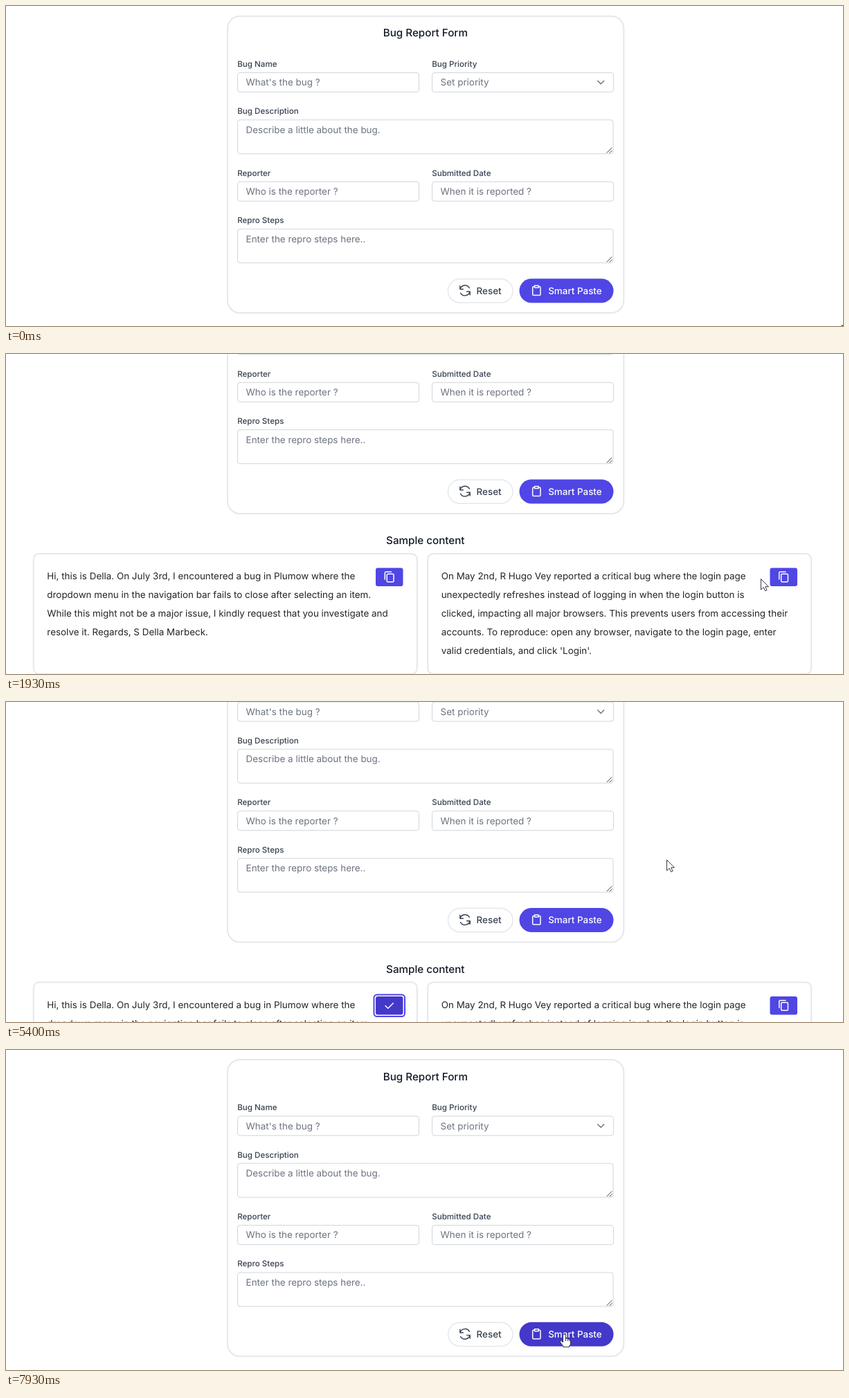
Recreate the animation shown at these times as an HTML page. Size 1209 px wide and 463 px high, loop 8 s.

```html
<!DOCTYPE html>
<html lang="en">
<head>
<meta charset="utf-8">
<title>Bug report form</title>
<style>
  html, body { margin: 0; width: 100%; height: 100%; overflow: hidden; background: #fff; }
  svg {
    display: block; width: 100%; height: 100%;
    font-family: Inter, "Open Sans", sans-serif;
    font-optical-sizing: none; text-rendering: geometricPrecision;
  }
  .title { font-size: 15.2px; font-weight: 500; fill: #111827; text-anchor: middle; }
  .label { font-size: 11.6px; font-weight: 500; fill: #374151; }
  .hint { font-size: 13.43px; fill: #6b7280; }
  .body { font-size: 13.43px; fill: #212529; }
  .action { font-size: 13.43px; font-weight: 500; fill: #374151; }
  .card { fill: #fff; stroke: #e5e7eb; stroke-width: 2; }
  .field { fill: #fff; stroke: #d1d5db; }
  .line { fill: none; stroke: #374151; stroke-width: 1.4; stroke-linecap: round; stroke-linejoin: round; }
  .white { stroke: #fff; stroke-width: 1.5; }
  .cursor { fill: #fff; stroke: #1f2430; stroke-width: 0.9; stroke-linejoin: round; }
</style>
</head>
<body>
<svg id="stage" viewBox="0 0 1209 463" preserveAspectRatio="xMinYMin meet"></svg>
<script>
const LOOP = 8000;
const TICK = 1000 / 15;
const PRIMARY = '#4f46e5', HOVER = '#4338ca', ACTIVE = '#3730a3';
const PRESS = 3530, RELEASE = 3660;

// Page geometry
const copyBox = { x: 534, y: 522.5, w: 39.5, h: 26.5 };
const otherCopyBox = { ...copyBox, x: 1103.5 };
const pasteBox = { x: 741.5, y: 394.5, w: 136, h: 35 };

// Motion keys: [time, value]
const scrollKeys = [
  [800, 0], [867, 31], [1000, 82], [1200, 135.5], [1500, 182], [1933, 213], [2067, 219.5],
  [4667, 219.5], [5400, 96.5], [5533, 96.5], [5800, 41], [5933, 41], [6533, 9.5],
  [6600, 9.5], [6933, 0.7]
];
const cursorX = [
  [67, 1207.5], [400, 1090.5], [2467, 1090.5], [2867, 800], [3200, 534], [3333, 540.5],
  [3733, 540.5], [4267, 947], [4400, 954.5], [7200, 954.5], [7867, 806.5]
];
const cursorY = [
  [67, 461.5], [400, 325.5], [2467, 325.5], [2867, 268], [3333, 316],
  [3733, 316], [4267, 229], [4400, 228.5], [7200, 228.5], [7867, 411]
];

// Drawing helpers
const text = (kind, x, y, content) => `<text class="${kind}" x="${x}" y="${y}">${content}</text>`;
const rect = (kind, x, y, w, h, r, extra = '') =>
  `<rect class="${kind}" x="${x}" y="${y}" width="${w}" height="${h}" rx="${r}" ${extra}/>`;
const path = (kind, d, extra = '') => `<path class="${kind}" d="${d}" ${extra}/>`;
const button = (box, r, id) => rect('', box.x, box.y, box.w, box.h, r, `id="${id}" fill="${PRIMARY}"`);

const input = (x, y, label, hint) =>
  text('label', x + 0.2, y - 8, label) + rect('field', x + 0.5, y + 0.5, 262, 28, 3.5) +
  text('hint', x + 12.6, y + 19.3, hint);

const textarea = (y, label, hint) =>
  text('label', 334.2, y - 8, label) + rect('field', 334.5, y + 0.5, 542.5, 49, 3.5) +
  text('hint', 346.6, y + 19.6, hint) +
  path('line', `M868 ${y + 48}l7 -7M872 ${y + 48.3}l3.3 -3.3`, 'style="stroke-width:1"');

const paragraph = (x, lines) =>
  lines.map((content, i) => text('body', x, 539.4 + i * 26.86, content)).join('');

const copyIcon = box => `<g transform="translate(${box.x} ${box.y})">` +
  rect('line white', 16.2, 8.7, 9.8, 11.6, 1.5) +
  path('line white', 'M13.3 16.5V7.2Q13.3 5.7 14.8 5.7H22.5') + '</g>';

const refreshIcon = path('line',
  'M656 409.5A7.3 7.3 0 0 1 669.4 408M670 413.5A7.3 7.3 0 0 1 656.6 415.3' +
  'M655.8 405V409.7H660.3M670.2 418V413.3H665.7');
const clipboardIcon = path('line white',
  'M763.5 406H762Q760.7 406 760.7 407.4V417.3Q760.7 418.6 762 418.6H770.7' +
  'Q772 418.6 772 417.3V407.4Q772 406 770.7 406H769.2M763.5 404.5H769.2V407.5H763.5Z');

const stage = document.getElementById('stage');
stage.innerHTML = `<g id="page">
  ${rect('card', 320, 14.7, 572.3, 429.3, 18)}
  ${text('title', 605.8, 44.4, 'Bug Report Form')}
  ${input(334, 96, 'Bug Name', "What's the bug ?")}
  ${input(615, 96, 'Bug Priority', 'Set priority')}
  ${path('line', 'M854.7 108.2L859.2 112.7L863.7 108.2', 'style="stroke:#6b7280"')}
  ${textarea(164.3, 'Bug Description', 'Describe a little about the bug.')}
  ${input(334, 253.8, 'Reporter', 'Who is the reporter ?')}
  ${input(615, 253.8, 'Submitted Date', 'When it is reported ?')}
  ${textarea(322.2, 'Repro Steps', 'Enter the repro steps here..')}
  ${rect('', 638.5, 395, 93.5, 34.3, 17.1, 'fill="#fff" stroke="#e5e7eb" stroke-width="1.4"')}
  ${refreshIcon}${text('action', 679.6, 416.7, 'Reset')}
  ${button(pasteBox, 17.5, 'paste')}
  ${clipboardIcon}${text('action', 783.2, 416.7, 'Smart Paste').replace('<text', '<text style="fill:#fff"')}
  ${text('title', 605.8, 488, 'Sample content')}
  ${rect('card', 39.8, 502, 554, 174, 8)}
  ${rect('card', 609.2, 502, 554, 174, 8)}
  ${paragraph(59.3, [
    'Hi, this is Della. On July 3rd, I encountered a bug in Plumow where the',
    'dropdown menu in the navigation bar fails to close after selecting an item.',
    'While this might not be a major issue, I kindly request that you investigate and',
    'resolve it. Regards, S Della Marbeck.'
  ])}
  ${paragraph(628.7, [
    'On May 2nd, R Hugo Vey reported a critical bug where the login page',
    'unexpectedly refreshes instead of logging in when the login button is',
    'clicked, impacting all major browsers. This prevents users from accessing their',
    'accounts. To reproduce: open any browser, navigate to the login page, enter',
    "valid credentials, and click 'Login'."
  ])}
  ${rect('', 531.5, 520, 44.5, 31.5, 4.5, `id="ring" fill="none" stroke="${PRIMARY}" stroke-width="2"`)}
  ${button(copyBox, 3, 'copy')}
  <g id="copyIcon">${copyIcon(copyBox)}</g>
  ${path('line white', 'M548 536L551.8 539.8L559.3 532.2', 'id="check"')}
  ${button(otherCopyBox, 3, 'otherCopy')}${copyIcon(otherCopyBox)}
</g>
<g id="cursor">
  ${path('cursor', 'M0 0V15.5L3.7 12.1L6.2 17.3L8.6 16.2L6.2 11.2H11Z', 'id="arrow"')}
  ${path('cursor', 'M-2 2Q-2 0 0 0T2 2V6.5Q4 5.5 5 7Q7 6.5 7.5 8.2Q9 8 9 10V13Q9 16 7 17.2V18.8H-1.5V17.5' +
    'Q-3 16 -6 11.5Q-6.6 9.5 -4.5 9.5L-2 12ZM2 6.5V10M5 7V10M7.5 8.2V10.5', 'id="hand"')}
</g>`;

const part = id => document.getElementById(id);
const [page, cursor, arrow, hand, paste, copy, ring, check, icon] =
  ['page', 'cursor', 'arrow', 'hand', 'paste', 'copy', 'ring', 'check', 'copyIcon'].map(part);
const show = (node, on) => node.setAttribute('visibility', on ? 'visible' : 'hidden');

// Monotone cubic through the keys; flat at turning points and ends.
function track(keys, t) {
  const last = keys.length - 1;
  if (t <= keys[0][0]) return keys[0][1];
  if (t >= keys[last][0]) return keys[last][1];
  const i = keys.findIndex(key => key[0] > t) - 1;
  const rate = k => (keys[k + 1][1] - keys[k][1]) / (keys[k + 1][0] - keys[k][0]);
  const slope = k => {
    if (k === 0 || k === last) return 0;
    const a = rate(k - 1), b = rate(k);
    return a * b > 0 ? 2 * a * b / (a + b) : 0;
  };
  const [t0, v0] = keys[i], [t1, v1] = keys[i + 1];
  const d = t1 - t0, u = (t - t0) / d, w = 1 - u;
  return v0 * w * w * (1 + 2 * u) + v1 * u * u * (3 - 2 * u) +
    d * u * w * (slope(i) * w - slope(i + 1) * u);
}

const inside = (box, x, y) => x >= box.x && x <= box.x + box.w && y >= box.y && y <= box.y + box.h;

function render(time) {
  const t = Math.floor((time % LOOP + 4) / TICK) * TICK % LOOP;
  const scroll = track(scrollKeys, t);
  const x = track(cursorX, t), y = track(cursorY, t);
  const overCopy = inside(copyBox, x, y + scroll);
  const overPaste = inside(pasteBox, x, y + scroll);
  const pressed = t >= PRESS && t < RELEASE;
  const copied = t >= RELEASE;

  page.setAttribute('transform', `translate(0 ${-scroll})`);
  cursor.setAttribute('transform', `translate(${x} ${y})`);
  show(hand, overCopy || overPaste);
  show(arrow, !overCopy && !overPaste);
  paste.setAttribute('fill', overPaste ? HOVER : PRIMARY);
  copy.setAttribute('fill', pressed ? ACTIVE : overCopy || copied ? HOVER : PRIMARY);
  show(ring, copied);
  show(check, copied);
  show(icon, !copied);
}

const start = performance.now();
function loop() {
  render(performance.now() - start);
  requestAnimationFrame(loop);
}
loop();
</script>
</body>
</html>
```
